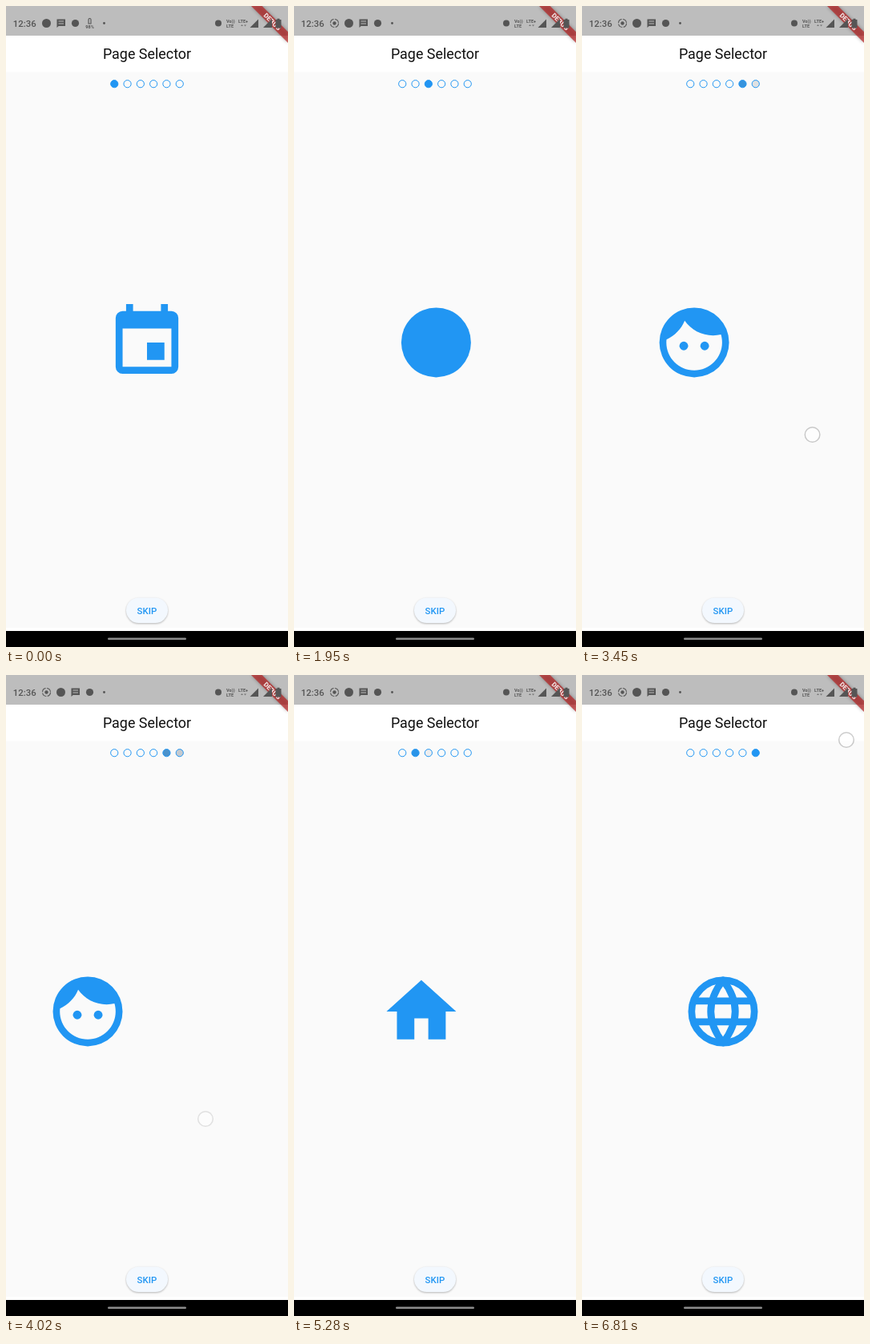
Animation of 352 by 800 pixels, one loop 6.84 s. Source, as an HTML page:

```html
<!DOCTYPE html>
<html lang="en">
<head>
<meta charset="utf-8">
<title>Page Selector</title>
<style>
  html, body { margin: 0; width: 100%; height: 100%; overflow: hidden; background: #fafafa; }
  svg { display: block; width: 352px; height: 800px; font-family: Roboto, "Liberation Sans", sans-serif; }
  .blue { fill: #2196f3; }
  .line { fill: none; stroke: #2196f3; stroke-width: 2; stroke-linejoin: round; }
  .status { fill: #555; }
  .thin { fill: none; stroke: #555; stroke-width: 1.1; }
  .tiny { font-size: 5.6px; font-weight: 700; }
  .skip { filter: drop-shadow(0 1px 1px rgba(0, 0, 0, .28)); }
  .banner { filter: drop-shadow(0 0 2px rgba(0, 0, 0, .45)); }
</style>
</head>
<body>
<svg viewBox="0 0 352 800">
  <defs>
    <clipPath id="view"><rect x="6.5" y="110" width="339" height="620"/></clipPath>
  </defs>

  <rect width="352" height="800" fill="#fafafa"/>
  <rect y="37" width="352" height="45.5" fill="#fff"/>
  <rect width="352" height="37" fill="#bdbdbd"/>
  <text x="176" y="66" font-size="17.9" text-anchor="middle" fill="#111">Page Selector</text>

  <g id="dots"></g>

  <g clip-path="url(#view)">
    <g class="page blue">
      <path fill-rule="evenodd" d="M17 12h-5v5h5zM16 1v2H8V1H6v2H5a2 2 0 0 0-2 2v14a2 2 0 0 0 2 2h14a2 2 0 0 0 2-2V5a2 2 0 0 0-2-2h-1V1zM19 19H5V8h14z"/>
    </g>
    <g class="page blue"><path d="M10 20v-6h4v6h5v-8h3L12 3 2 12h3v8z"/></g>
    <g class="page blue"><circle cx="12" cy="12" r="10"/></g>
    <g class="page blue">
      <path d="M22 5.72l-4.6-3.86-1.29 1.53 4.6 3.86zM7.88 3.39L6.6 1.86 2 5.71l1.29 1.53zM12.5 8H11v6l4.75 2.85.75-1.23-4-2.37z"/>
      <circle class="line" cx="12" cy="13" r="8"/>
    </g>
    <g class="page blue">
      <circle cx="9" cy="13" r="1.25"/><circle cx="15" cy="13" r="1.25"/>
      <path fill-rule="evenodd" d="M12 2a10 10 0 1 0 0 20a10 10 0 0 0 0-20zM12 20c-4.41 0-8-3.59-8-8 0-.29.02-.58.05-.86 2.36-1.05 4.23-2.98 5.21-5.37C11.07 8.33 14.05 10 17.42 10c.78 0 1.53-.09 2.25-.26.21.71.33 1.47.33 2.26 0 4.41-3.59 8-8 8z"/>
    </g>
    <g class="page line">
      <circle cx="12" cy="12" r="9"/>
      <path d="M4 9h16M4 15h16M12 3Q5 12 12 21Q19 12 12 3z"/>
    </g>
  </g>

  <rect class="skip" x="150" y="738.5" width="52" height="31.5" rx="15.75" fill="#f3f8fe"/>
  <text class="blue" x="176" y="758.5" font-size="11.4" font-weight="500" letter-spacing=".08" text-anchor="middle">SKIP</text>

  <rect y="776" width="352" height="4" fill="#fff"/>
  <rect y="780" width="352" height="20" fill="#000"/>
  <rect x="127" y="788.4" width="98" height="2.6" rx="1.3" fill="#8c8c8c"/>

  <path class="banner" d="M306 0h13.7L352 32.3V46z" fill="#b71c1c" fill-opacity=".68"/>
  <text transform="translate(332.4 19.6) rotate(45)" y="2.9" font-size="8.3" font-weight="900" text-anchor="middle" fill="#fff" fill-opacity=".85">DEBUG</text>

  <g class="status">
    <text x="8.7" y="25.8" font-size="11.4" font-weight="500">12:36</text>
    <g id="record" transform="translate(50.5 21.5)">
      <circle class="thin" r="5" stroke-dasharray="6.4 1.45"/><circle r="2.2"/>
    </g>
    <g id="tray">
      <circle cx="50.5" cy="21.5" r="5.5"/>
      <path fill-rule="evenodd" d="M63.5 16.5h10.5v8.5h-8.3l-2.2 2zM65.5 18.5v1h6.5v-1zM65.5 21.5v1h6.5v-1z"/>
      <circle cx="86.5" cy="21.5" r="4.6"/>
    </g>
    <g id="heat">
      <path class="thin" d="M103 22v-5a1.5 1.5 0 0 1 3 0v5z"/>
      <text class="tiny" x="104.5" y="28" text-anchor="middle">98%</text>
    </g>
    <circle cx="122.5" cy="21.5" r="1.4"/>

    <circle cx="265" cy="21.5" r="4"/>
    <text class="tiny" x="275" y="20.5">Vo))</text>
    <text class="tiny" x="275" y="26.5">LTE</text>
    <text class="tiny" x="290" y="20.5">LTE+</text>
    <path d="M293 25l1.5-2 1.5 2zM297 23.5h3l-1.5 2z" opacity=".7"/>
    <path d="M304.5 27L315 16.5V27z"/>
    <path d="M321 27L332 16V27z"/>
    <path d="M336.5 17h2v-1.3h3V17h2v10.5h-7z"/>
  </g>

  <circle id="touch" r="9.3" fill="#fff" fill-opacity=".5" stroke="#000" stroke-opacity=".2" stroke-width="1.5"/>
</svg>

<script>
const LOOP = 6840, WIDTH = 339, SCALE = 4.35, SETTLE = 0.0156, FADE = 120;
const RECORD_AT = 400, SKIP_AT = 6150, SKIP_TIME = 300;

// press time, release time, page direction, start x, end x, y
const swipes = [
  [800, 960, 1, 330, 170, 473],
  [1480, 1640, 1, 325, 165, 490],
  [2230, 2390, 1, 325, 160, 500],
  [2990, 3150, 1, 325, 150, 515],
  [3390, 3550, 1, 325, 150, 535],
  [3804, 3964, -1, 90, 249, 554],
  [4155, 4315, -1, 80, 260, 535],
  [4485, 4645, -1, 110, 280, 520],
  [4980, 5140, -1, 80, 265, 515],
  [5470, 5630, -1, 80, 265, 510]
];

const $ = id => document.getElementById(id);
const clamp = v => Math.min(1, Math.max(0, v));
const pages = [...document.querySelectorAll(".page")];
const touch = $("touch");

const dots = pages.map((_, i) => {
  const dot = document.createElementNS("http://www.w3.org/2000/svg", "circle");
  const attrs = { cx: 176 + (i - 2.5) * 16.3, cy: 97.2, r: 4.6, stroke: "#2196f3", "stroke-width": 1 };
  for (const key in attrs) dot.setAttribute(key, attrs[key]);
  return $("dots").appendChild(dot);
});

// The "ease" curve: cubic-bezier(.25, .1, .25, 1)
function ease(x) {
  let lo = 0, hi = 1;
  for (let i = 0; i < 20; i++) {
    const s = (lo + hi) / 2;
    if (0.75 * s * (1 - s) + s ** 3 < x) lo = s; else hi = s;
  }
  return 0.3 * lo * (1 - lo) ** 2 + 3 * lo * lo * (1 - lo) + lo ** 3;
}

const drag = (t, down, up) => clamp((t - down) / (up - down)) ** 1.6;

function progress(t, [down, up, , x0, x1]) {
  const moved = Math.abs(x1 - x0) / WIDTH;
  if (t < up) return moved * drag(t, down, up);
  const rest = (1 - moved) * Math.exp(-SETTLE * (t - up));
  return rest < 0.003 ? 1 : 1 - rest;
}

function showTouch(x, y, alpha) {
  touch.setAttribute("cx", x);
  touch.setAttribute("cy", y);
  touch.setAttribute("opacity", alpha);
}

function drawTouch(t) {
  showTouch(0, 0, 0);
  const gestures = [...swipes, [6070, SKIP_AT, 0, 176, 176, 756]];
  for (const [down, up, , x0, x1, y] of gestures) {
    if (t >= down && t < up + FADE) {
      showTouch(x0 + (x1 - x0) * drag(t, down, up), y, 1 - clamp((t - up) / FADE));
    }
  }
  if (t >= 6690) showTouch(330, 10 + 71 * clamp((t - 6690) / 120), 1);
}

function place(i, offset, level) {
  pages[i].setAttribute("visibility", Math.abs(offset) < 1 ? "visible" : "hidden");
  pages[i].setAttribute("transform",
    `translate(${176 + offset * WIDTH - 12 * SCALE} ${419.9 - 12 * SCALE}) scale(${SCALE})`);
  // Colour and alpha both blend from transparent black
  const [r, g, b] = [33, 150, 243].map(c => Math.round(c * level));
  dots[i].setAttribute("fill", `rgba(${r},${g},${b},${level})`);
}

function draw(t) {
  const jump = ease(clamp((t - SKIP_AT) / SKIP_TIME));
  const page = swipes.reduce((sum, s) => sum + s[2] * progress(t, s), 0);
  const last = pages.length - 1;
  pages.forEach((_, i) => {
    if (t < SKIP_AT) place(i, i - page, clamp(1 - Math.abs(i - page)));
    else if (i === 0) place(i, -jump, 1 - jump);
    else if (i === last) place(i, 1 - jump, jump);
    else place(i, 1, 0);
  });

  const recording = t >= RECORD_AT;
  $("record").setAttribute("visibility", recording ? "visible" : "hidden");
  $("heat").setAttribute("visibility", recording ? "hidden" : "visible");
  $("tray").setAttribute("transform", `translate(${recording ? 18 : 0} 0)`);
  drawTouch(t);
}

const start = performance.now();
function frame() {
  draw((performance.now() - start) % LOOP);
  requestAnimationFrame(frame);
}
frame();
</script>
</body>
</html>
```
